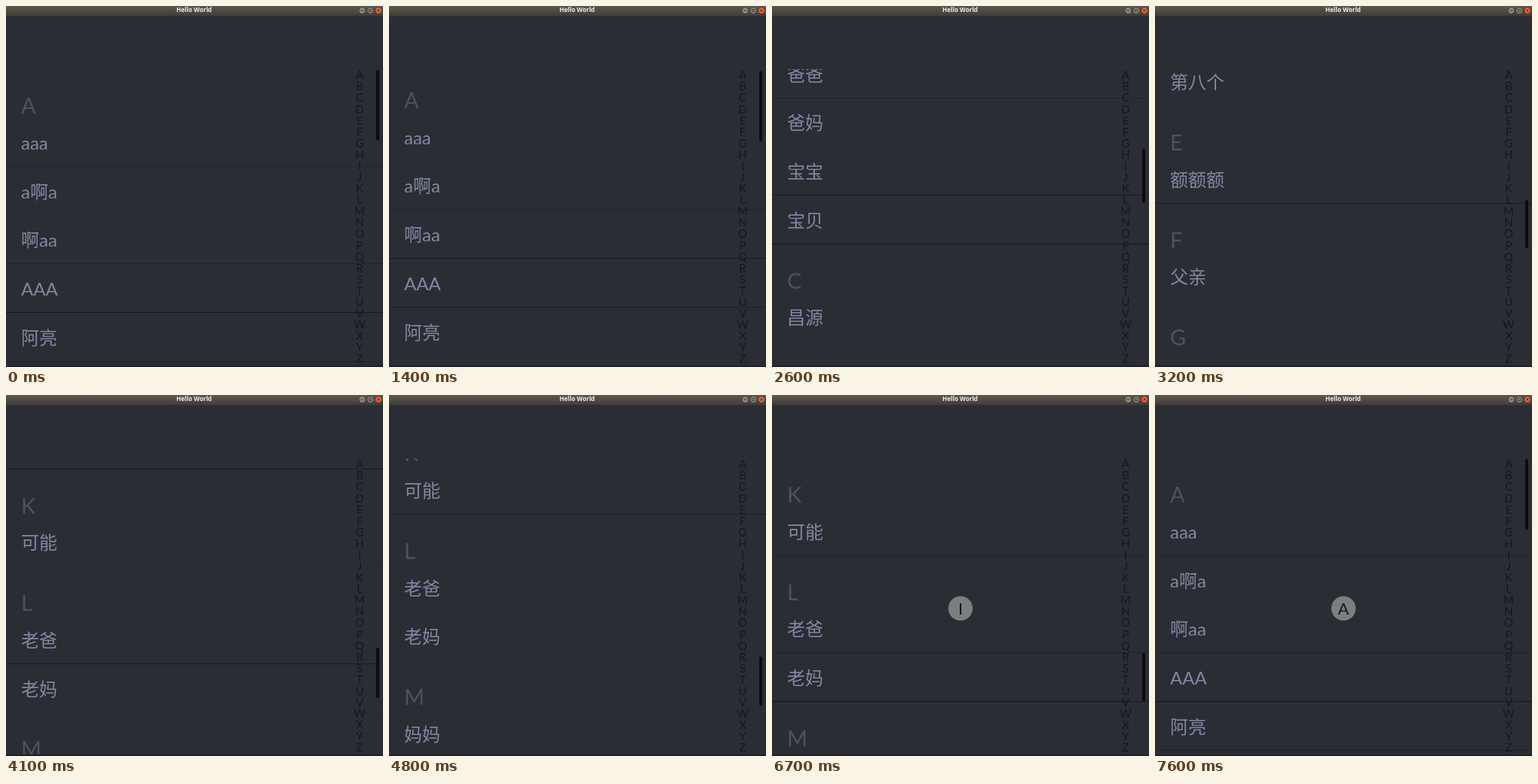
These frames come from a looping animation (500 by 480 pixels, 8000 ms). An HTML page:

```html
<!DOCTYPE html>
<html lang="zh">
<head>
<meta charset="utf-8">
<title>Hello World</title>
<style>
  html, body { margin: 0; width: 100%; height: 100%; overflow: hidden; background: #2a2d34; }
  svg { display: block; width: 500px; height: 480px; }
  text { font-family: Lato, "Noto Sans CJK SC", "Noto Sans CJK", sans-serif; }
  .item { font-size: 24px; fill: #8089a0; }
  .head { font-size: 29px; fill: #4e525b; }
  .index { font-size: 15px; fill: #15171b; text-anchor: middle; }
  .title { font: bold 8.1px "Open Sans", sans-serif; fill: #efede8; text-anchor: middle; }
  .pop { font-size: 22px; fill: #17191c; text-anchor: middle; }
</style>
</head>
<body>
<svg viewBox="0 0 500 480">
  <defs>
    <linearGradient id="bar" x2="0" y2="1">
      <stop offset="0" stop-color="#5b584f"/>
      <stop offset="1" stop-color="#403e38"/>
    </linearGradient>
    <clipPath id="view"><rect y="84" width="500" height="394"/></clipPath>
  </defs>
  <rect width="500" height="480" fill="#2a2d34"/>
  <g clip-path="url(#view)">
    <g id="rows"></g>
    <g id="lines"></g>
  </g>
  <g id="index"></g>
  <rect id="thumb" x="491" width="4" rx="2" fill="#0b0c0f"/>
  <g id="bubble">
    <circle cx="250" cy="283.7" r="16.2" fill="#7d7e7e"/>
    <text id="letter" class="pop" x="250" y="291.6"></text>
  </g>
  <rect y="478" width="500" height="2" fill="#251d28"/>
  <rect width="500" height="13" fill="url(#bar)"/>
  <rect y="13" width="500" height="1" fill="#34332f"/>
  <text class="title" x="249.5" y="8.4">Hello World</text>
  <g stroke="#35332e" stroke-width=".7">
    <circle cx="472.5" cy="6" r="4.4" fill="#8b887f"/>
    <circle cx="483.3" cy="6" r="4.4" fill="#8b887f"/>
    <circle cx="494" cy="6" r="4.4" fill="#e75f35"/>
    <path d="M470.5 6h4M481.6 4.5h3.4v3h-3.4zM492.4 4.4l3.2 3.2m0-3.2l-3.2 3.2" fill="none" stroke-width=".9"/>
  </g>
</svg>
<script>
const LOOP = 8000, STEP = 100, TOP = 84, ROW = 64.75;
const sections = {
  A: 'aaa a啊a 啊aa AAA 阿亮 阿南 阿文',
  B: '爸爸 爸妈 宝宝 宝贝',
  C: '昌源',
  D: '第八个',
  E: '额额额',
  F: '父亲',
  G: '高高高',
  H: '好好好',
  K: '可能',
  L: '老爸 老妈',
  M: '妈妈',
  N: '你好',
  P: '朋友',
  W: '我们'
};

// time, scroll offset, thumb top, thumb height
const keys = [
  [1300, 0, 85, 94],
  [2000, 228.25, 127, 85],
  [3200, 1051.65, 258, 64],
  [4100, 1604.15, 336, 67],
  [4600, 1765, 362, 65],
  [5500, 774.75, 209, 67],
  [5800, 518, 167, 65]
];
const dragStart = 6000, drag = 'BCDEFGHIJHGFEDCBA';

const $ = id => document.getElementById(id);
function add(parent, tag, attrs, text = '') {
  const el = document.createElementNS('http://www.w3.org/2000/svg', tag);
  for (const k in attrs) el.setAttribute(k, attrs[k]);
  el.textContent = text;
  parent.append(el);
  return el;
}

const headRow = {}, lines = [];
let count = 0;
for (const [name, items] of Object.entries(sections)) {
  headRow[name] = count;
  add($('rows'), 'text', { class: 'head', x: 20, y: TOP + ROW * count++ + 59 }, name);
  for (const item of items.split(' ')) {
    add($('rows'), 'text', { class: 'item', x: 20, y: TOP + ROW * count++ + 42 }, item);
    const el = add($('lines'), 'rect', { width: 500, height: 1, fill: '#121418' });
    lines.push({ el, y: TOP + ROW * count });
  }
}
for (let i = 0; i < 26; i++) {
  add($('index'), 'text', { class: 'index', x: 469, y: 97.3 + i * 15.08 }, String.fromCharCode(65 + i));
}

const rate = (i, c) => (keys[i + 1][c] - keys[i][c]) / (keys[i + 1][0] - keys[i][0]);
function slope(i, c) {
  if (i === 0 || i === keys.length - 1) return 0;
  const a = rate(i - 1, c), b = rate(i, c);
  return a * b <= 0 ? 0 : 2 * a * b / (a + b);
}
function glide(t, c) {
  const last = keys.length - 1;
  if (t <= keys[0][0]) return keys[0][c];
  if (t >= keys[last][0]) return keys[last][c];
  const i = keys.findIndex(k => k[0] > t) - 1;
  const span = keys[i + 1][0] - keys[i][0], u = (t - keys[i][0]) / span;
  const w = u * u * (3 - 2 * u);
  return keys[i][c] * (1 - w) + keys[i + 1][c] * w
    + span * u * (1 - u) * ((1 - u) * slope(i, c) - u * slope(i + 1, c));
}

function pose(t) {
  if (t < dragStart) {
    return { scroll: glide(t, 1), top: glide(t, 2), size: glide(t, 3), letter: '' };
  }
  const letter = drag[Math.min((t - dragStart) / STEP, drag.length - 1)];
  // letters without entries land on the next section
  const scroll = ROW * headRow[Object.keys(sections).find(s => s >= letter)];
  return scroll
    ? { scroll, top: 84 + scroll * 0.16, size: 64.5, letter }
    : { scroll, top: 85, size: 94, letter };
}

function draw(ms) {
  const { scroll, top, size, letter } = pose(Math.floor(ms % LOOP / STEP) * STEP);
  $('rows').setAttribute('transform', `translate(0 ${-scroll})`);
  for (const { el, y } of lines) {
    // hairlines fade with their sub-pixel phase
    const at = y - scroll;
    el.setAttribute('y', Math.floor(at - 0.125));
    el.setAttribute('opacity', 0.45 + 0.45 * Math.cos(2 * Math.PI * (at - 0.75)));
  }
  $('thumb').setAttribute('y', top);
  $('thumb').setAttribute('height', size);
  $('bubble').style.display = letter ? '' : 'none';
  $('letter').textContent = letter;
}

const start = performance.now();
function tick() {
  draw(performance.now() - start);
  requestAnimationFrame(tick);
}
tick();
</script>
</body>
</html>
```
